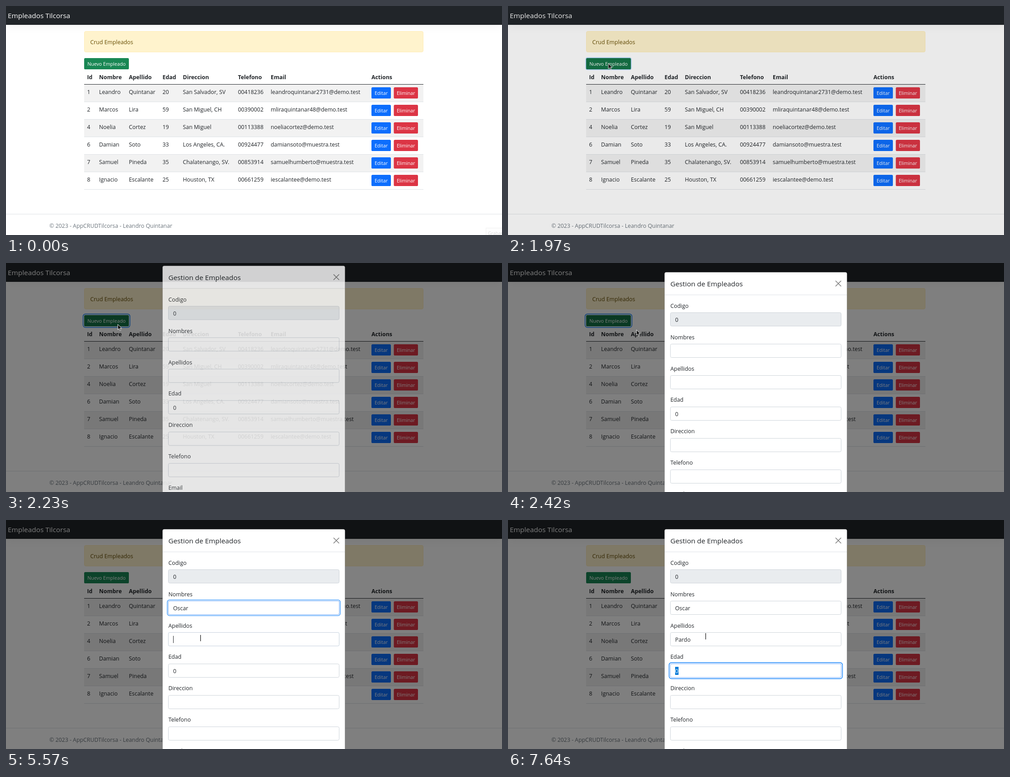
An HTML page for the animation above (8000 ms loop, 1098 px wide and 510 px high).

```html
<!DOCTYPE html>
<html lang="es">
<head>
<meta charset="utf-8">
<title>Empleados</title>
<style>
  html, body { margin: 0; width: 100%; height: 100%; overflow: hidden; background: #fff; }
  svg { display: block; width: 1098px; height: 510px; }
  text { font: 12.35px "Open Sans", "Noto Sans", sans-serif; fill: #212529; white-space: pre; }
  .big { font-size: 15.35px; }
  .small { font-size: 10.65px; fill: #fff; text-anchor: middle; }
  .bold { font-weight: 700; }
  .nav { fill: #212529; filter: drop-shadow(0 3.2px 9.6px rgba(0, 0, 0, .05)); }
</style>
</head>
<body>
<svg id="stage" viewBox="0 0 1098 510"></svg>
<script>
const LOOP = 8000;
const stage = document.getElementById('stage');

// ---- drawing helpers ----
function add(parent, tag, attrs = {}, content = '') {
  const el = document.createElementNS('http://www.w3.org/2000/svg', tag);
  for (const key in attrs) el.setAttribute(key, attrs[key]);
  el.textContent = content;
  return parent.appendChild(el);
}
const group = parent => add(parent, 'g');
const rect = (parent, x, y, width, height, fill, more) =>
  add(parent, 'rect', { x, y, width, height, fill, ...more });
const label = (parent, x, y, content, more) => add(parent, 'text', { x, y, ...more }, content);
const set = (el, attrs) => { for (const key in attrs) el.setAttribute(key, attrs[key]); };
const show = (el, on) => el.setAttribute('visibility', on ? 'visible' : 'hidden');

function button(parent, x, y, width, fill, content) {
  const box = rect(parent, x, y, width, 25, fill, { rx: 2.6 });
  label(parent, x + width / 2, y + 17, content, { class: 'small' });
  return box;
}

// Two-layer focus ring; the returned function takes its strength, 0 to 1.
function focusRing(parent, x, y, w, h) {
  const layers = [['#258cfb', 3.2], ['#fff', 1.6]].map(([fill, size]) =>
    ({ el: rect(parent, x, y, w, h, fill), size }));
  return p => layers.forEach(({ el, size }) => {
    const d = size * p;
    set(el, { x: x - d, y: y - d, width: w + 2 * d, height: h + 2 * d, rx: 3 + d, opacity: p });
  });
}

// ---- timing helpers ----
// Linear value through [time, value...] stops.
function track(stops, t) {
  if (t <= stops[0][0]) return stops[0].slice(1);
  for (let i = 1; i < stops.length; i++) {
    const a = stops[i - 1], b = stops[i];
    if (t < b[0]) {
      const k = (t - a[0]) / (b[0] - a[0]);
      return a.slice(1).map((v, n) => v + (b[n + 1] - v) * k);
    }
  }
  return stops[stops.length - 1].slice(1);
}
const ramp = (t, from, to) => Math.min(1, Math.max(0, (t - from) / (to - from)));
const pulse = (t, on, off) => ramp(t, on, on + 150) - ramp(t, off, off + 150);
const smooth = k => k * k * (3 - 2 * k);
const typed = (word, times, t) => word.slice(0, times.filter(at => t >= at).length);

// ---- page ----
const page = group(stage);
rect(page, 0, 0, 1098, 510, '#fff');
rect(page, 0, 0, 1098, 42, '#212529', { class: 'nav' });
label(page, 4, 27, 'Empleados Tilcorsa', { class: 'big', style: 'fill:#fff' });
rect(page, 173.5, 56.5, 750, 46, '#fff3cd', { stroke: '#ffecb5', rx: 3.2 });
label(page, 186.5, 85, 'Crud Empleados', { style: 'fill:#664d03' });

const newRing = focusRing(page, 173, 116, 99, 25);
const newButton = button(page, 173, 116, 99, '#198754', 'Nuevo Empleado');

const columns = [179.5, 206, 272, 346.5, 391.5, 513.5, 586, 809];
const people = [
  [1, 'Leandro', 'Quintanar', 20, 'San Salvador, SV', '00418236', 'leandroquintanar2731@demo.test'],
  [2, 'Marcos', 'Lira', 59, 'San Miguel, CH', '00390002', 'mliraquintanar48@demo.test'],
  [4, 'Noelia', 'Cortez', 19, 'San Miguel', '00113388', 'noeliacortez@demo.test'],
  [6, 'Damian', 'Soto', 33, 'Los Angeles, CA.', '00924477', 'damiansoto@muestra.test'],
  [7, 'Samuel', 'Pineda', 35, 'Chalatenango, SV.', '00853914', 'samuelhumberto@muestra.test'],
  [8, 'Ignacio', 'Escalante', 25, 'Houston, TX', '00661259', 'iescalantee@demo.test'],
];
['Id', 'Nombre', 'Apellido', 'Edad', 'Direccion', 'Telefono', 'Email', 'Actions']
  .forEach((name, i) => label(page, columns[i], 163, name, { class: 'bold' }));
rect(page, 173, 174, 751, 1, '#212529');
people.forEach((person, i) => {
  const y = 175 + 39 * i;
  if (i % 2 === 0) rect(page, 173, y, 751, 38, '#f2f2f2');
  rect(page, 173, y + 38, 751, 1, '#dee2e6');
  person.forEach((value, n) => label(page, columns[n], y + 21, value));
  button(page, 809, y + 6, 43, '#0d6efd', 'Editar');
  button(page, 858.5, y + 6, 53.5, '#dc3545', 'Eliminar');
});

rect(page, 0, 463, 1098, 1, '#dee2e6');
label(page, 96, 494, '© 2023 - AppCRUDTilcorsa - Leandro Quintanar', { style: 'fill:#6c757d' });

const tip = group(page);
rect(tip, 1062.5, 494.5, 40, 20, '#fdfdfd', { stroke: '#f0f0f0' });
label(tip, 1067, 510, 'Grabar', { style: 'fill:#dcdcdc;font-size:10px' });

const backdrop = rect(stage, 0, 0, 1098, 510, '#000');

// ---- dialog ----
const dialog = group(stage);
rect(dialog, 346.5, 20.5, 404, 560, '#fff', { stroke: '#000', 'stroke-opacity': .2, rx: 3.8 });
label(dialog, 359.5, 52, 'Gestion de Empleados', { class: 'big' });
add(dialog, 'path', { d: 'M725.5 40l11.5 11.5M737 40l-11.5 11.5', stroke: '#7f7f7f',
  'stroke-width': 1.6, 'stroke-linecap': 'round' });
rect(dialog, 347, 70.5, 403, 1, '#dee2e6');

const fields = ['Codigo', 'Nombres', 'Apellidos', 'Edad', 'Direccion', 'Telefono', 'Email']
  .map((name, i) => {
    const y = Math.round(110 + 69.9 * i);
    label(dialog, 359.5, Math.round(100 + 69.8 * i), name);
    const ring = focusRing(dialog, 359, y, 379, 31);
    const outline = { stroke: '#ced4da', rx: 3 };
    rect(dialog, 359.5, y + .5, 378, 30, i ? '#fff' : '#e9ecef', outline);
    const edge = rect(dialog, 359.5, y + .5, 378, 30, 'none', { ...outline, stroke: '#86b7fe' });
    const mark = rect(dialog, 370, y + 7, 7.5, 18, '#0078d7', { visibility: 'hidden' });
    const value = label(dialog, 370, y + 21, i === 0 || i === 3 ? '0' : '');
    const focus = p => { ring(p); set(edge, { opacity: p }); };
    focus(0);
    return { y, value, mark, focus };
  });
const [, first, last, age] = fields;
const caret = rect(dialog, 370, last.y + 8, 1, 16, '#212529');

// ---- pointer ----
const pointer = group(stage);
const arrow = add(pointer, 'path', { d: 'M0 0V12L2.9 9.4 4.9 14 6.9 13.1 5 8.7H8.8Z',
  fill: '#111', stroke: '#fff', 'stroke-width': .9 });
const beam = rect(pointer, 0, -7, 1.2, 14, '#111');

const moves = [
  [1560, 222, 128], [2100, 222, 128], [2420, 284, 149], [2630, 357, 132], [3200, 430, 191],
  [4810, 430, 191], [5000, 430, 162], [5130, 430, 164], [5500, 430, 263],
  [5570, 430, 263], [5710, 437, 259],
];
function pointerAt(t) {
  if (t < 845) {
    const k = smooth(ramp(t, 40, 810));
    return [1078 - 760 * k, 505 - 156 * k];
  }
  if (t < 1560) {
    const k = smooth(ramp(t, 845, 1560));
    return [318 - 96 * k, 349 - 221 * k];
  }
  return track(moves, t);
}

function draw(t) {
  show(tip, t < 70);

  const [x, y] = pointerAt(t);
  const inField = t > 2630 && [first, last].some(f => y >= f.y && y <= f.y + 31);
  set(pointer, { transform: `translate(${x} ${y})` });
  show(arrow, t >= 70 && !inField);
  show(beam, inField);

  const hover = pulse(t, 1450, 2430);
  const tint = [[25, 21], [135, 115], [84, 71]].map(([a, b]) => Math.round(a + (b - a) * hover));
  set(newButton, { fill: `rgb(${tint})` });
  newRing(pulse(t, 1900, 2430));

  set(backdrop, { opacity: .5 * ramp(t, 1946, 2096) });
  const slide = 1 - ramp(t, 2110, 2410);
  set(dialog, { opacity: ramp(t, 2110, 2260), transform: `translate(0 ${-40 * slide * slide})` });

  first.focus(pulse(t, 3190, 5550));
  last.focus(pulse(t, 5560, 7490));
  age.focus(pulse(t, 7490, LOOP));
  first.value.textContent = typed('Oscar', [3750, 3890, 4090, 4220, 4280], t);
  last.value.textContent = typed('Pardo', [6180, 6640, 6840, 7040, 7170], t);
  show(caret, t >= 5570 && t < 6050);

  const selected = t >= 7500;
  show(age.mark, selected);
  age.value.style.fill = selected ? '#fff' : '';
}

const start = performance.now();
function frame() {
  draw((performance.now() - start) % LOOP);
  requestAnimationFrame(frame);
}
frame();
</script>
</body>
</html>
```
